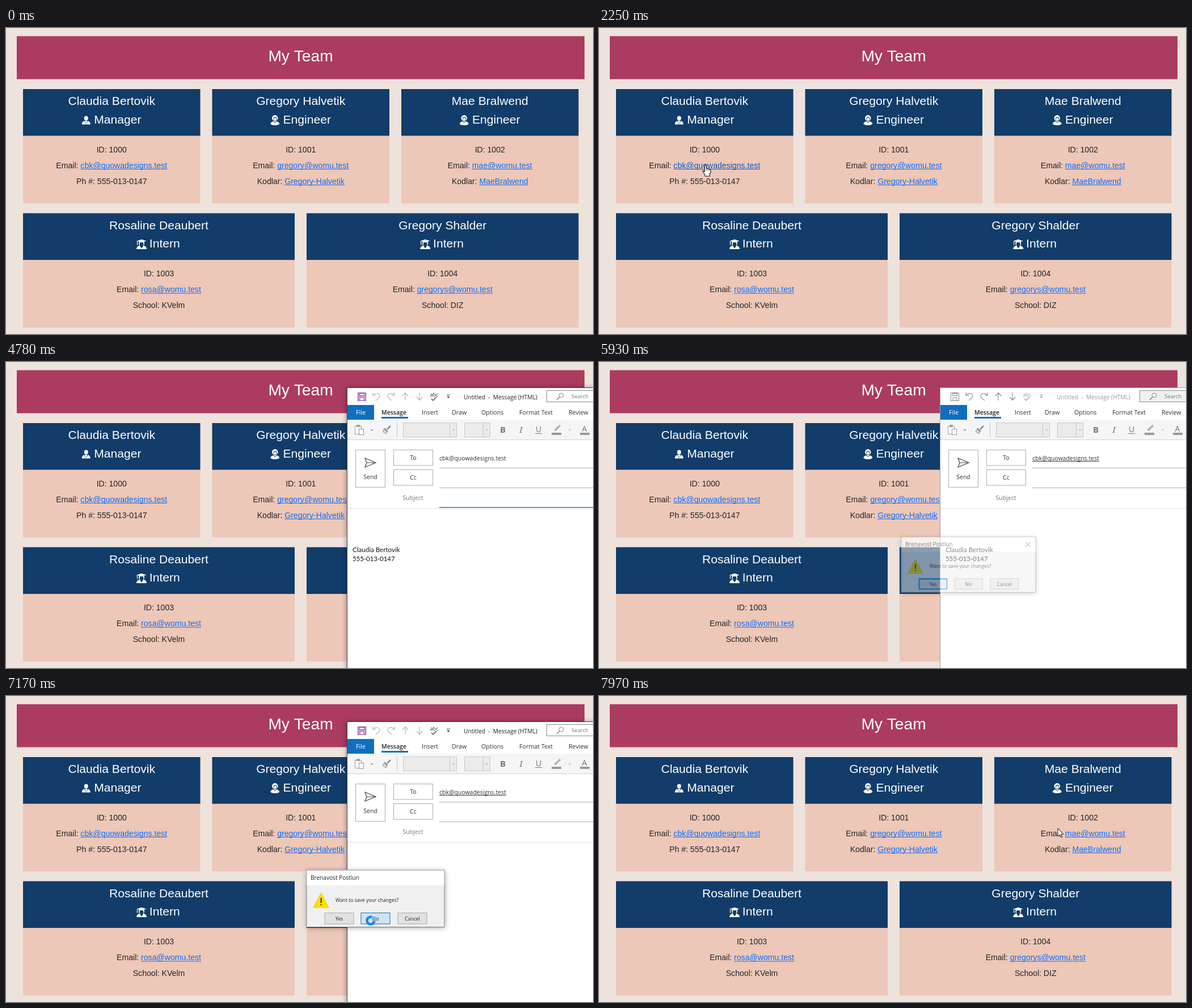
An HTML page with a canvas that plays this animation: 1035 px wide and 541 px high, repeating every 8 s.

```html
<!DOCTYPE html>
<html lang="en">
<head>
<meta charset="utf-8">
<title>My Team</title>
<style>
html, body { margin: 0; width: 100%; height: 100%; overflow: hidden; background: #eee2dc; }
canvas { display: block; }
</style>
</head>
<body>
<canvas id="stage" width="1035" height="541"></canvas>
<script>
const LOOP = 8000;
const stage = document.getElementById('stage').getContext('2d');
const layer = document.createElement('canvas');
layer.width = 1400;
layer.height = 900;
const layerCtx = layer.getContext('2d');
let g = stage;

const SANS = '"Liberation Sans", Arial, sans-serif';
const UI = '"Open Sans", "Noto Sans", sans-serif';
const BODY = 'Lato, sans-serif';
const NAVY = '#123c69', INK = '#212529', BLUE = '#106ebe';
const MAIL = 'cbk@quowadesigns.test', PHONE = '555-013-0147', LEAD = 'Claudia Bertovik';
const MAIL_BOX = [601, 45, 742, 855], DIALOG_BOX = [529.5, 307.5, 244, 101.5];

const team = [
  { x: 30, y: 108, w: 312.5, name: LEAD, role: 'Manager', id: 1000, mail: MAIL, extra: 'Ph #: ' + PHONE },
  { x: 363.5, y: 108, w: 312.5, name: 'Gregory Halvetik', role: 'Engineer', id: 1001, mail: 'gregory@womu.test', extra: 'Kodlar: ', link: 'Gregory-Halvetik' },
  { x: 697, y: 108, w: 312.5, name: 'Mae Bralwend', role: 'Engineer', id: 1002, mail: 'mae@womu.test', extra: 'Kodlar: ', link: 'MaeBralwend' },
  { x: 30, y: 327.5, w: 479, name: 'Rosaline Deaubert', role: 'Intern', id: 1003, mail: 'rosa@womu.test', extra: 'School: KVelm' },
  { x: 530, y: 327.5, w: 479.5, name: 'Gregory Shalder', role: 'Intern', id: 1004, mail: 'gregorys@womu.test', extra: 'School: DIZ' }
];

// Linear interpolation through [time, ...values] keys
function along(keys, t) {
  if (t <= keys[0][0]) return keys[0].slice(1);
  for (let i = 1; i < keys.length; i++) {
    const a = keys[i - 1], b = keys[i];
    if (t < b[0]) {
      const k = (t - a[0]) / (b[0] - a[0]);
      return a.slice(1).map((v, j) => v + (b[j + 1] - v) * k);
    }
  }
  return keys[keys.length - 1].slice(1);
}

function rect(x, y, w, h, fill, stroke) {
  if (fill) { g.fillStyle = fill; g.fillRect(x, y, w, h); }
  if (stroke) { g.strokeStyle = stroke; g.lineWidth = 1; g.strokeRect(x + .5, y + .5, w - 1, h - 1); }
}

function text(str, x, y, font, color, align = 'left') {
  g.font = font;
  g.fillStyle = color;
  g.textAlign = align;
  g.fillText(str, x, y);
}

function line(points, color, width = 1, close = false, fill) {
  g.beginPath();
  points.forEach(([x, y]) => g.lineTo(x, y));
  if (close) g.closePath();
  if (fill) { g.fillStyle = fill; g.fill(); }
  if (color) { g.strokeStyle = color; g.lineWidth = width; g.stroke(); }
}

function disc(x, y, rx, ry, fill) {
  g.beginPath();
  g.ellipse(x, y, rx, ry, 0, 0, Math.PI * 2);
  g.fillStyle = fill;
  g.fill();
}

function chevron(x, y, color) {
  line([[x - 2, y - 1], [x, y + 1], [x + 2, y - 1]], color, 1);
}

function at(x, y, draw) {
  g.save();
  g.translate(x, y);
  draw();
  g.restore();
}

function shoulders(w, top, bottom) {
  g.beginPath();
  g.moveTo(-w, bottom);
  g.quadraticCurveTo(-w, top + 1, -w / 3, top);
  g.lineTo(w / 3, top);
  g.quadraticCurveTo(w, top + 1, w, bottom);
  g.closePath();
  g.fillStyle = '#fff';
  g.fill();
}

const icons = {
  Manager: { icon: -45, text: -31, draw() {
    disc(0, -3.6, 3.5, 4, '#fff');
    shoulders(7.5, 1, 7.5);
    line([[-3, .8], [0, 6.5], [3, .8]], NAVY, 1);
    line([[-.9, 1.5], [.9, 1.5], [1, 5], [0, 6.5], [-1, 5]], null, 0, true, '#fff');
  } },
  Engineer: { icon: -45.5, text: -31.3, draw() {
    disc(0, -3.8, 5.2, 5.2, '#fff');
    disc(.3, -2.4, 3, 3.3, NAVY);
    disc(.3, -1.9, 2.2, 2.7, '#fff');
    shoulders(7.8, 2, 7);
    disc(0, 6.3, 7.8, 2.7, '#fff');
    line([[-2.4, 2.3], [0, 5], [2.4, 2.3]], NAVY, 1);
  } },
  Intern: { icon: -30.5, text: -16.7, draw() {
    shoulders(9, 2.2, 8.5);
    disc(0, -1.5, 5, 5.5, '#fff');
    disc(0, -.2, 3.4, 4, NAVY);
    line([[-3, 3], [0, 7], [3, 3]], null, 0, true, NAVY);
    line([[-8.5, -6], [0, -8.8], [8.5, -6], [0, -3.2]], null, 0, true, '#fff');
    line([[-7.5, -6], [-7.5, 1]], '#fff', 1.2);
  } }
};

function infoLine(label, link, cx, y, color) {
  const font = '14.08px ' + SANS;
  g.font = font;
  const a = g.measureText(label).width;
  const b = link ? g.measureText(link).width : 0;
  const x = cx - (a + b) / 2;
  text(label, x, y, font, INK);
  if (link) {
    text(link, x + a, y, font, color);
    rect(x + a, y + 1.5, b, 1, color);
  }
}

function drawCard(p, hover) {
  const cx = p.x + p.w / 2, font = '21.12px ' + SANS;
  const icon = icons[p.role];
  rect(p.x, p.y, p.w, 202, '#edc7b7');
  rect(p.x, p.y, p.w, 82.5, NAVY);
  text(p.name, cx, p.y + 28, font, '#fff', 'center');
  text(p.role, cx + icon.text, p.y + 60.7, font, '#fff');
  at(cx + icon.icon, p.y + 55, icon.draw);
  infoLine('ID: ' + p.id, '', cx, p.y + 111.5);
  infoLine('Email: ', p.mail, cx, p.y + 139.5, hover ? '#0a58ca' : '#0d6efd');
  infoLine(p.extra, p.link, cx, p.y + 167.5, '#0d6efd');
}

function drawPage(hover) {
  rect(0, 0, 1035, 541, '#eee2dc');
  rect(19, 14.5, 1001, 76, '#ac3b61');
  text('My Team', 519.5, 59, '28.16px ' + SANS, '#fff', 'center');
  team.forEach((p, i) => drawCard(p, hover && i === 0));
}

function drawTitleBar(active) {
  const save = active ? '#9b4f96' : '#8a8a8a';
  const dark = active ? '#333' : '#999';
  const gray = active ? '#b5b5b5' : '#909090';
  rect(620, 54, 15, 15, active ? '#c9a3cb' : '#fff', save);
  rect(623, 55, 9, 5, '#fff', save);
  rect(623.5, 62.5, 8, 6, '#fff', save);
  for (const [x, dir] of [[653, 1], [679, -1]]) {
    at(x, 61, () => {
      g.scale(dir, 1);
      line([[-6, -7], [-6, -2], [-1, -2]], gray, 1.2);
      g.beginPath();
      g.moveTo(-6, -2);
      g.bezierCurveTo(-2, -7, 6, -6, 6, -1);
      g.quadraticCurveTo(6, 2, -1, 7);
      g.stroke();
    });
  }
  for (const [x, dir] of [[704, 1], [729, -1]]) {
    at(x, 61, () => {
      g.scale(1, dir);
      line([[0, 7], [0, -6]], gray, 1.2);
      line([[-5, -1], [0, -6.5], [5, -1]], gray, 1.2);
    });
  }
  text('abc', 755, 61, '9px ' + UI, dark, 'center');
  line([[750, 65], [753, 68], [759, 62]], dark, 1.2);
  line([[777, 58.5], [783, 58.5]], dark, 1);
  line([[777.5, 61], [782.5, 61], [780, 64]], null, 0, true, dark);
  text('Untitled  -  Message (HTML)', 807, 66, '10.2px ' + UI, active ? '#222' : '#999');
  rect(953, 50, 110, 21, active ? '#fff' : '#f0f0f0', '#8a8a8a');
  g.beginPath();
  g.arc(979, 59, 4, 0, Math.PI * 2);
  g.stroke();
  line([[976, 62], [971, 67]], '#777', 1.2);
  text('Search', 997, 64, '9.6px ' + UI, '#777');
}

function drawTabs(closing) {
  const font = '10.7px ' + UI;
  rect(602, 76, 47, 26, BLUE);
  text('File', 625.5, 93, font, '#fff', 'center');
  if (closing) {
    text('Help', 686, 93, font, '#333');
    rect(662, 97, 46, 3, BLUE);
    return;
  }
  text('Message', 662, 93, '600 10.5px ' + UI, '#222');
  rect(662, 97, 47, 3, BLUE);
  [['Insert', 733], ['Draw', 786], ['Options', 838], ['Format Text', 905], ['Review', 992]]
    .forEach(([s, x]) => text(s, x, 93, font, '#333'));
}

function combo(x, w) {
  rect(x, 107, w, 26, '#ebebeb', '#c8c8c8');
  rect(x + w - 13, 107, 1, 26, '#c8c8c8');
  chevron(x + w - 6, 120, '#999');
}

function drawRibbon() {
  const gray = '#8c8c8c';
  rect(602, 102, 741, 36, '#f5f5f5');
  rect(602, 137, 741, 1, '#d2d2d2');
  rect(615, 113, 12, 15, '#f8f8f8', '#a0a0a0');
  rect(618, 111, 6, 4, '#a0a0a0');
  rect(622, 118, 9, 11, '#fff', '#999');
  chevron(645, 120, '#444');
  line([[678, 113], [672, 119]], gray, 2.5);
  line([[667, 117], [673, 123]], gray, 2);
  line([[666, 119], [664, 123], [670, 127], [672, 123]], gray, 1, true, '#ddd');
  rect(689, 106, 1, 27, '#c8c8c8');
  combo(700, 95);
  combo(808, 46);
  text('B', 876, 125, '700 15px ' + UI, '#777', 'center');
  text('I', 908, 125, 'italic 15px "Noto Serif", serif', '#777', 'center');
  text('U', 939, 124, '14px ' + UI, '#777', 'center');
  rect(933, 126, 12, 1, '#777');
  line([[977, 112], [968, 121]], gray, 3);
  line([[977, 112], [969, 120]], '#fff', 1);
  rect(962, 125, 17, 4, '#999');
  chevron(994, 120, '#999');
  text('A', 1020, 123, '14px ' + UI, '#777', 'center');
  rect(1012, 125, 17, 4, '#999');
}

function drawFields(s) {
  const font = '10.5px ' + UI;
  rect(616, 155, 53, 67, '#fff', '#ababab');
  line([[633, 170], [652, 178], [633, 186], [636, 178]], '#444', 1.2, true);
  line([[636, 178], [651, 178]], '#444', 1);
  text('Send', 642.5, 207, font, '#333', 'center');
  [['To', 155], ['Cc', 190]].forEach(([label, y]) => {
    rect(683, y, 70, 28.5, '#fff', '#ababab');
    text(label, 718, y + 18, font, '#333', 'center');
  });
  text('Subject', 717.5, 244, font, '#777', 'center');
  text(MAIL, 764, 174, font, '#333');
  if (s.resolved) rect(764, 175, g.measureText(MAIL).width, 1, '#333');
  rect(764, 187, 579, 1, '#ababab');
  rect(764, 222, 579, 1, '#ababab');
  rect(602, 258, 741, 1, '#e1e1e1');
  if (s.focus) rect(764, 256.5, 579, 1.5, '#2b88d8');
  if (s.caret) rect(764, 233, 1, 13, '#000');
  text(LEAD, 611, 336, '11.6px ' + BODY, '#111');
  text(PHONE, 611, 352, '11.4px ' + BODY, '#111');
}

function drawMail(s) {
  rect(...MAIL_BOX, '#fff', s.active ? '#2b4a74' : '#a0a0a0');
  drawTitleBar(s.active);
  drawTabs(s.closing);
  drawRibbon();
  if (s.ready && !s.closing) drawFields(s);
}

function button(label, x, state) {
  const fill = { plain: '#e1e1e1', main: '#e1e1e1', hot: '#cce4f7' }[state];
  const edge = { plain: '#adadad', main: '#0078d7', hot: '#2b6ca8' }[state];
  rect(x, 383, 52, 20.5, fill, edge);
  if (state === 'main') rect(x + 1, 384, 50, 18.5, null, edge);
  text(label, x + 26, 396.5, '8.7px ' + UI, '#222', 'center');
}

function drawDialog(s) {
  rect(...DIALOG_BOX, '#f0f0f0', '#777');
  rect(530.5, 308.5, 242, 26.5, '#fff');
  text('Brenavost Postlun', 537, 325, '10.1px ' + UI, '#222');
  if (!s.pressed) {
    line([[754, 317], [763, 326]], '#444');
    line([[763, 317], [754, 326]], '#444');
  }
  line([[555.5, 348], [569, 374], [542, 374]], '#e8cf00', 1, true, '#ffe000');
  rect(554.7, 357, 1.8, 9, '#222');
  rect(554.7, 368, 1.8, 2, '#222');
  text('Want to save your changes?', 581, 364, '8.65px ' + UI, '#222');
  button('Yes', 561.5, s.pressed ? 'plain' : 'main');
  button('No', 625.5, s.hot ? 'hot' : 'plain');
  button('Cancel', 690.5, 'plain');
}

// Shadow around a box only, so that it never shows through a faded window
function dropShadow(box, strength) {
  g.save();
  g.beginPath();
  g.rect(-100, -100, 1600, 1200);
  g.rect(...box);
  g.clip('evenodd');
  g.shadowColor = 'rgba(0,0,0,' + strength + ')';
  g.shadowBlur = 9;
  g.shadowOffsetY = 1;
  rect(...box, '#fff');
  g.restore();
}

// Paints a window off-screen, then places it faded and scaled about a centre
function place(draw, box, cx, cy, alpha, scale, shadow) {
  g = layerCtx;
  g.clearRect(0, 0, layer.width, layer.height);
  draw();
  g = stage;
  g.save();
  g.globalAlpha = alpha;
  g.translate(cx, cy);
  g.scale(scale, scale);
  g.translate(-cx, -cy);
  if (shadow) dropShadow(box, shadow);
  g.drawImage(layer, 0, 0);
  g.restore();
}

function drawArrow(x, y) {
  at(x, y, () => {
    g.scale(.88, .88);
    line([[0, 0], [0, 16], [3.7, 12.6], [6.1, 18.2], [8.5, 17.2], [6.2, 11.8], [11.2, 11.8]], '#111', 1.1, true, '#fff');
  });
}

function drawHand(x, y) {
  at(x, y, () => {
    g.lineJoin = 'round';
    line([[-1.3, 0], [1.3, 0], [1.6, 6.5], [4, 6.3], [6, 7], [8.6, 8.3], [9, 13], [7, 17], [7, 20],
      [-1, 20], [-1.5, 17], [-5, 11.5], [-4.5, 10], [-1.6, 12]], '#111', 1.1, true, '#fff');
    for (const px of [1.6, 4, 6.4]) line([[px, 7.5], [px, 10]], '#111', .8);
  });
}

function drawBusy(x, y, t) {
  const a = t / 130;
  g.lineWidth = 4.5;
  g.strokeStyle = '#1f86e0';
  g.beginPath();
  g.arc(x, y, 6.5, 0, Math.PI * 2);
  g.stroke();
  g.strokeStyle = '#6fb8f2';
  g.beginPath();
  g.arc(x, y, 6.5, a, a + 1.6);
  g.stroke();
}

const pathToLink = [[530, 938, 486], [660, 800, 450], [800, 628, 402], [920, 420, 358], [1040, 270, 316],
  [1180, 370, 300], [1320, 480, 284], [1390, 480, 284], [1590, 188, 242], [3980, 188, 242],
  [4050, 330, 262], [4150, 620, 245], [4250, 860, 228], [4310, 1040, 222]];
const pathToNo = [[6000, 1040, 330], [6300, 860, 375], [6640, 650, 393], [6700, 650, 393], [6800, 643, 397],
  [7370, 643, 397], [7500, 560, 341], [7570, 560, 341], [7700, 479, 300], [7830, 640, 255], [7970, 809, 234]];

const onLink = ([x, y]) => x > 131 && x < 284 && y > 230 && y < 253;

function drawPointer(t, pos) {
  if (t < 530 || (t > 4310 && t < 6000)) return;
  const [x, y] = pos;
  if ((t >= 2190 && t < 2250) || (t >= 7100 && t < 7270)) drawBusy(x, y, t);
  else if (onLink(pos)) drawHand(x, y);
  else drawArrow(x, y);
}

function draw(t) {
  const pos = along(t < 5000 ? pathToLink : pathToNo, t);
  const closing = t >= 7250;
  drawPage(t >= 1390 && t < 4310 && onLink(pos));

  if (t >= 2650 && t < 7370) {
    const [alpha, scale] = along([[7249, 1, 1], [7250, .6, .985], [7300, .13, .9515], [7370, .1, .945]], t);
    const active = t < 5840 || t >= 7100;
    const s = {
      active, closing,
      ready: t >= 2850,
      resolved: t >= 5640,
      focus: t < 5840,
      caret: t >= 3190 && t < 5840 && Math.floor((t - 3190) / 530) % 2 === 0
    };
    place(() => drawMail(s), MAIL_BOX, 972, 275, alpha, scale, active && s.ready ? .4 : 0);
  }

  if (t >= 5840 && t < 7370) {
    const [alpha, scale] = along([[5840, .08, .955], [5930, .5, .975], [6060, 1, 1], [7249, 1, 1],
      [7250, .6, .985], [7300, .15, .965], [7370, .12, .955]], t);
    const s = { pressed: t >= 7100, hot: t >= 6600 };
    place(() => drawDialog(s), DIALOG_BOX, 651.5, 358, alpha, scale, .4);
  }

  drawPointer(t, pos);
}

function tick() {
  draw(performance.now() % LOOP);
  requestAnimationFrame(tick);
}
tick();
</script>
</body>
</html>
```
